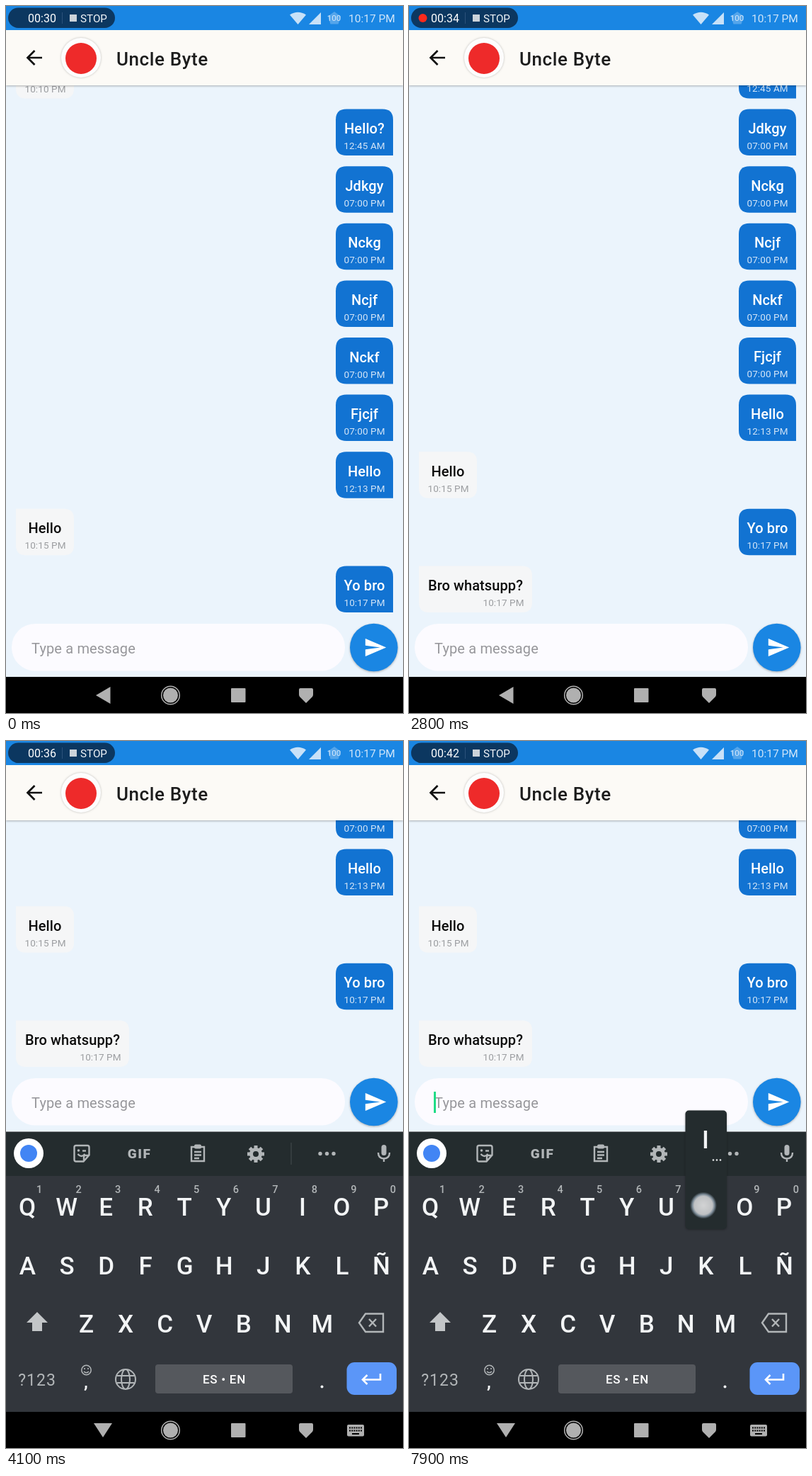
Recreate the animation shown at these times as an HTML page. Size 561 by 998 pixels, loop 8000 ms.

```html
<!DOCTYPE html>
<html lang="en">
<head>
<meta charset="utf-8">
<title>Chat</title>
<style>
  html, body { margin: 0; width: 100%; height: 100%; overflow: hidden; background: #000; }
  svg { display: block; font-family: Roboto, sans-serif; }
  text { white-space: pre; }
  .shadow { filter: drop-shadow(0 1.5px 1.5px rgba(0, 0, 0, .3)); }
  .line { fill: none; stroke: #b2b6b8; stroke-width: 2.4; }
</style>
</head>
<body>
<svg id="stage" width="561" height="998" viewBox="0 0 561 998"></svg>
<script>
const LOOP = 8000;
const ROW = 80.6;          // distance between chat rows
const KEYBOARD = 396;      // keyboard height
const ARRIVAL = 600;       // last message comes in
const OPEN = 3100;         // keyboard starts to slide up
const SLIDE = 272;
const PRESS = 7800;        // key touched
const CURSOR_TOGGLES = [3100, 3400, 3600, 4000, 4300, 4700, 5000, 5400, 5700,
                        6000, 6300, 6600, 7000, 7300, 7700];
const BLUE = '#1a86e3', DARK = '#242c2e', ICON = '#b2b6b8', MEDIUM = 'font-weight="500"';

const text = (x, y, s, size, fill, more = '') =>
  `<text x="${x}" y="${y}" font-size="${size}" fill="${fill}" text-anchor="middle" ${more}>${s}</text>`;
const rect = (x, y, w, h, fill, r = 0) =>
  `<rect x="${x}" y="${y}" width="${w}" height="${h}" rx="${r}" fill="${fill}"/>`;
const circle = (x, y, r, fill, more = '') =>
  `<circle cx="${x}" cy="${y}" r="${r}" fill="${fill}" ${more}/>`;
const path = (d, fill, more = '') => `<path d="${d}" fill="${fill}" ${more}/>`;
const line = (d, more = '') => `<path d="${d}" class="line" ${more}/>`;
const group = (id, body, more = '') => `<g id="${id}" ${more}>${body}</g>`;

const messages = [
  ['Hello', '10:10 PM', 82], ['Hello?', '12:45 AM'], ['Jdkgy', '07:00 PM'],
  ['Nckg', '07:00 PM'], ['Ncjf', '07:00 PM'], ['Nckf', '07:00 PM'],
  ['Fjcjf', '07:00 PM'], ['Hello', '12:13 PM'], ['Hello', '10:15 PM', 82],
  ['Yo bro', '10:17 PM'], ['Bro whatsupp?', '10:17 PM', 160],
];

// Messages with a width are received, the others are sent.
function bubble([body, time, received], i) {
  const y = 65 + ROW * i, w = received || 81, x = received ? 14 : 466;
  const shape = received
    ? `M${x} ${y}h${w - 14}q14 0 14 14v37.5q0 14 -14 14h${28 - w}q-14 0 -14 -14z`
    : `M${x + 15} ${y}h${w - 30}q15 0 15 15v50.5h${15 - w}q-15 0 -15 -15v-35.5q0 -15 15 -15z`;
  return group('message' + i,
    path(shape, received ? '#f5f6f7' : '#1273d2') +
    text(x + w / 2, y + 34.5, body, 20, received ? '#0c0c0c' : '#fff', MEDIUM + ' letter-spacing=".1"') +
    text(x + w - 40.5, y + 56.5, time, 13.5, received ? '#9b9da0' : '#d3e5f7', 'letter-spacing=".1"'));
}

const composer = group('composer',
  rect(8, 872, 471, 66.5, '#fcfbff', 33) +
  text(36, 914, 'Type a message', 20, '#97979b', 'style="text-anchor:start" letter-spacing=".15"') +
  group('cursor', rect(35, 891, 3, 30, '#1fdc86')) +
  circle(519.8, 905.5, 33.8, BLUE, 'class="shadow"') +
  path('M2 21L23 12 2 3v7l15 2-15 2z', '#fff', 'transform="translate(505 888.7) scale(1.4)"'));

function keyRow(keys, x, y) {
  return [...keys].map((key, i) => text(x + 55.55 * i, y, key, 35, '#f3f5f6', MEDIUM)).join('');
}

const gearTeeth = [...Array(8).keys()].map(i =>
  `<rect x="350.5" y="571" width="5" height="6" fill="${ICON}" transform="rotate(${i * 45} 353 583)"/>`).join('');

const toolbar =
  rect(0, 551.5, 561, 62.5, DARK) +
  circle(32, 582, 21, '#fff') + circle(32, 582, 12, '#4285f4') +
  line('M99 571h16q2.5 0 2.5 2.5v11l-8 9h-10.5q-2.5 0 -2.5 -2.5v-17.5q0-2.5 2.5-2.5zM117 585h-5q-2 0-2 2v5M101.5 583q5 6 10 0') +
  circle(102.5, 578, 1.8, ICON) + line('M108 578.5h5') +
  text(188.5, 589, 'GIF', 19, ICON, 'font-weight="900" letter-spacing="1.5"') +
  line('M262 573h18v20h-18zM266 580h10M266 584.5h10M266 589h7') + rect(266, 569.5, 10, 6, ICON, 2) +
  gearTeeth + circle(353, 583, 6.5, 'none', `stroke="${ICON}" stroke-width="5"`) +
  rect(402.5, 567, 1, 31, '#454c4f') +
  [444, 453.5, 463].map(x => circle(x, 582.5, 2.7, ICON)).join('') +
  rect(530.5, 570, 7, 15, ICON, 3.5) + line('M526 581q0 8.5 8 8.5t8-8.5M534 589v5');

const keyboard = group('keyboard',
  rect(0, 552, 561, KEYBOARD, '#32363c') + toolbar +
  keyRow('QWERTYUIOP', 30, 669.5) + keyRow('ASDFGHJKLÑ', 30.5, 752.5) + keyRow('ZXCVBNM', 113.5, 834.5) +
  [...'1234567890'].map((n, i) => text(47 + 55.55 * i, 638, n, 14.5, '#b2b6b8', MEDIUM)).join('') +
  path('M44 806l15 15h-8v12h-14v-12h-8z', '#c3c6c8') +
  line('M508 808.5h25v25.5h-25l-9-12.7zM513 816l10 10.5M523 816l-10 10.5') +
  text(44, 910, '?123', 23, ICON, 'letter-spacing="1"') +
  circle(113.5, 888, 6.7, 'none', `stroke="${ICON}" stroke-width="1.5"`) +
  circle(111, 886, 1.1, ICON) + circle(116, 886, 1.1, ICON) + line('M110 890q3.5 3.5 7 0', 'style="stroke-width:1.5"') +
  text(113, 913, ',', 24, '#f3f5f6', 'font-weight="700"') +
  line('M155 901a14 14 0 1 0 28 0a14 14 0 1 0 -28 0M163 901a6 14 0 1 0 12 0a6 14 0 1 0 -12 0M157 896h24M157 906h24', 'style="stroke-width:2"') +
  rect(211, 880, 194, 41, '#55585d', 4) +
  text(308.5, 907, 'ES • EN', 17, '#fff', MEDIUM + ' letter-spacing=".7"') +
  circle(446.5, 911.5, 2, '#f3f5f6') +
  rect(481.5, 877, 70.5, 46, '#5b96f8', 11) +
  line('M529 893v8.5h-25M510.5 895l-6.5 6.5l6.5 6.5', 'style="stroke:#fff;stroke-width:2.6"'));

const popup = group('popup',
  `<g class="shadow">${rect(390.5, 521.5, 58.5, 167.5, DARK, 5)}</g>` +
  text(419, 575, 'I', 35, '#f3f5f6', MEDIUM) +
  [430, 435, 440].map(x => circle(x, 591.5, 1.3, '#e8eaeb')).join('') +
  circle(416, 655.5, 19, 'url(#touch)'));

const navigation =
  rect(0, 947, 561, 51, '#000') +
  group('back', path('M127 973l20.5-12v24z', '#b0b0b0')) +
  group('hide', path('M124 963h26l-13 20z', '#b0b0b0') + rect(482, 965, 24, 16.5, '#b0b0b0', 2) +
    line('M485 969.5h18M485 973.5h18', 'style="stroke:#000;stroke-width:2;stroke-dasharray:2 1.2"') +
    line('M489 978h10', 'style="stroke:#000;stroke-width:2"')) +
  circle(232.5, 973, 10.5, '#b0b0b0') + circle(232.5, 973, 12.8, 'none', 'stroke="#b0b0b0" stroke-width="1.5"') +
  rect(318, 963, 20.5, 20, '#b0b0b0', 1) +
  path('M416 963h16q2 0 2 2v7q0 2-1.5 3.5l-8.5 8.5l-8.5-8.5q-1.5-1.5-1.5-3.5v-7q0-2 2-2z', '#b0b0b0');

const header =
  `<g class="shadow">${rect(0, 34, 561, 78, '#fcfaf6')}</g>` +
  line('M51 73h-20M40.5 63l-10 10l10 10', 'style="stroke:#111;stroke-width:2.7"') +
  circle(106, 73, 28, '#fdfdfd', 'style="filter:drop-shadow(0 0 1.5px rgba(0,0,0,.25))"') +
  circle(106, 74, 22, '#ee2a2a') +
  text(156, 84, 'Uncle Byte', 26, '#1c1c1c', MEDIUM + ' style="text-anchor:start" letter-spacing=".6"') +
  rect(0, 0, 561, 34, BLUE) + rect(3, 2.5, 151, 28.5, '#0c3760', 14.2) +
  group('record', circle(19.5, 17, 6, '#fb2a1c')) +
  text(51, 22.5, '', 16, '#fff', 'id="timer"') +
  rect(79, 9, 1, 16, '#2c527a') + rect(90, 12, 10, 10, '#ccd3da') +
  text(124, 22.5, 'STOP', 15.2, '#f2f5f8') +
  path('M412.5 26L401 12.5q11.5-7.5 23 0z', '#c8e1f8') + path('M445 9v17h-17z', '#c8e1f8') +
  path('M464 8l9 6.5l-3.5 11h-11l-3.5-11z', '#54a5eb') +
  text(463.5, 21, '100', 11.5, '#d7e9fa') + text(517, 23, '10:17 PM', 15.5, '#d0e5f9');

const stage = document.getElementById('stage');
stage.innerHTML =
  `<defs><radialGradient id="touch">
    <stop offset="0" stop-color="#d2d3d4"/><stop offset=".68" stop-color="#bfc1c3"/>
    <stop offset=".82" stop-color="#7c8b97"/><stop offset="1" stop-color="#6f7f8c" stop-opacity="0"/>
  </radialGradient></defs>` +
  rect(0, 0, 561, 998, '#ebf4fc') + group('chat', messages.map(bubble).join('')) +
  composer + group('backdrop', rect(0, 551, 561, KEYBOARD, '#fdfdff')) +
  keyboard + popup + navigation + header;

const part = id => document.getElementById(id);
const show = (id, on) => part(id).setAttribute('visibility', on ? 'visible' : 'hidden');
const shift = (id, y) => part(id).setAttribute('transform', `translate(0 ${y})`);

function draw(t) {
  const arrived = t >= ARRIVAL, open = t >= OPEN;
  const lift = open ? -KEYBOARD : 0;
  shift('chat', lift - (arrived ? ROW : 0));
  shift('composer', lift);
  show('message10', arrived);

  const left = 1 - Math.min(1, Math.max(0, (t - OPEN) / SLIDE));
  shift('keyboard', KEYBOARD * left * left);
  for (const id of ['keyboard', 'backdrop', 'hide']) show(id, open);
  show('back', !open);
  show('popup', t >= PRESS);
  show('cursor', CURSOR_TOGGLES.filter(at => t >= at).length % 2);

  // The recording clock runs at one and a half times real speed.
  const seconds = 30 + (t + 220) * 1.5 / 1000;
  part('timer').textContent = '00:' + Math.floor(seconds);
  show('record', seconds % 1 >= .5);
}

function tick() {
  draw(performance.now() % LOOP);
  requestAnimationFrame(tick);
}
tick();
</script>
</body>
</html>
```
